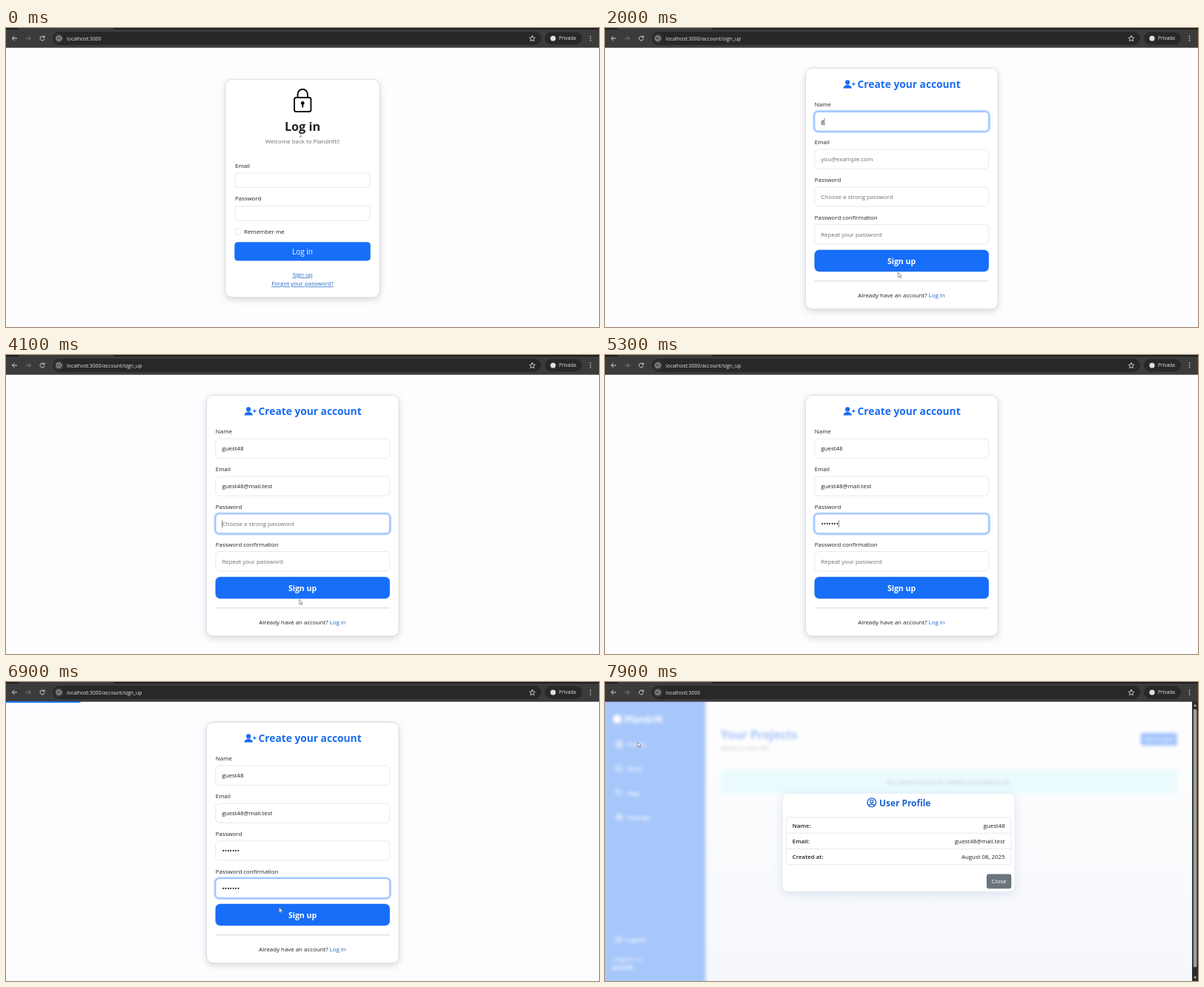
Animation of 800x404 px, one loop 8 s. Source, as an HTML page:

```html
<!DOCTYPE html>
<html lang="en">
<head>
<meta charset="utf-8">
<title>Sign-up walkthrough</title>
<style>
html, body { margin: 0; width: 100%; height: 100%; overflow: hidden; background: #fdfdff; }
svg { display: block; width: 800px; height: 404px; font: 7.9px "Open Sans", "Noto Sans", sans-serif; }
text { fill: #1e2125; white-space: pre; }
.b { font-weight: 700; }
.s { font-weight: 600; }
.m { text-anchor: middle; }
.e { text-anchor: end; }
.w { fill: #fff; }
.mute { fill: #686f76; }
.blue { fill: #1a6cf0; }
.link { fill: #2269c4; }
.u { text-decoration: underline; }
.btn { fill: #176ef8; stroke: #1668ea; stroke-width: .5; }
.line { fill: none; stroke-linecap: round; stroke-linejoin: round; }
.input { fill: #fff; stroke: #dfe2e7; stroke-width: .8; }
.card { fill: #fff; stroke: #d3d6db; stroke-width: .8; filter: drop-shadow(0 3px 4px rgba(0, 0, 0, .14)); }
.url { font-size: 6.9px; fill: #e4e4e4; }

.login, .signup, .dash, .short, .long, .status, .beam { animation: 8s step-end infinite; }
.login { animation-name: login; }
.signup, .long { animation-name: signup; }
.dash { animation-name: dash; }
.short { animation-name: short; }
.status { animation-name: status; }
.beam { animation-name: beam; }
@keyframes login { 0% { opacity: 1 } 15.75%, 100% { opacity: 0 } }
@keyframes signup { 0% { opacity: 0 } 15.75% { opacity: 1 } 86.75%, 100% { opacity: 0 } }
@keyframes dash { 0% { opacity: 0 } 86.75%, 100% { opacity: 1 } }
@keyframes short { 0% { opacity: 1 } 15.75% { opacity: 0 } 86.75%, 100% { opacity: 1 } }
@keyframes status { 0% { opacity: 0 } 8% { opacity: 1 } 21.2%, 100% { opacity: 0 } }
@keyframes beam {
  0% { opacity: 1; transform: translate(397.5px, 144px) }
  2.9% { opacity: 0; transform: translate(355px, 294px) }
  77.5% { opacity: 1; transform: translate(355px, 294px) }
  79.4%, 100% { opacity: 0; transform: translate(355px, 294px) }
}

.arrow { animation: move 8s ease-in-out infinite, seen 8s step-end infinite; }
@keyframes move {
  0%, 2.9% { transform: translate(397px, 150px) }
  8%, 54% { transform: translate(395.5px, 330px) }
  54.1%, 79.4% { transform: translate(359px, 298px) }
  80.6%, 91.2% { transform: translate(368.5px, 304.5px) }
  94.8%, 100% { transform: translate(44px, 81px) }
}
@keyframes seen { 0% { opacity: 0 } 2.9% { opacity: 1 } 54% { opacity: 0 } 79.4%, 100% { opacity: 1 } }

.bar { transform-origin: 0 0; animation: load 8s linear infinite, fade 8s linear infinite; }
@keyframes load {
  0%, 10.6% { transform: scaleX(0) }
  10.7% { transform: scaleX(.1) }
  15.75% { transform: scaleX(.13) }
  16.25% { transform: scaleX(.3475) }
  17%, 17.2% { transform: scaleX(1) }
  17.3%, 83.7% { transform: scaleX(0) }
  83.8% { transform: scaleX(.1) }
  86.7% { transform: scaleX(.13) }
  87.5% { transform: scaleX(.8325) }
  88%, 100% { transform: scaleX(1) }
}
@keyframes fade {
  0%, 16.4% { opacity: 1 }
  17.2% { opacity: 0 }
  17.4%, 87.2% { opacity: 1 }
  88%, 100% { opacity: 0 }
}

.page { animation: blur 8s ease-out infinite; }
.veil { animation: veil 8s ease-out infinite; }
.modal { animation: modal 8s ease-out infinite; }
@keyframes blur { 0%, 96% { filter: blur(0) } 97%, 100% { filter: blur(2.2px) } }
@keyframes veil { 0%, 96% { opacity: 0 } 97%, 100% { opacity: .6 } }
@keyframes modal {
  0%, 96% { opacity: 0; transform: translateY(-20px) }
  97.5%, 100% { opacity: 1; transform: none }
}
</style>
</head>
<body>
<svg viewBox="0 0 800 404">
  <defs>
    <linearGradient id="sky" x2="0" y2="1">
      <stop offset="0" stop-color="#fdfdff"/><stop offset=".4" stop-color="#f7f8fd"/><stop offset="1" stop-color="#e8edf8"/>
    </linearGradient>
    <g id="user" class="line" stroke-width="1.1">
      <circle r="4.7"/><circle cy="-1.1" r="1.6"/><path d="M-3.2 3.2Q0 .2 3.2 3.2"/>
    </g>
  </defs>
  <rect width="800" height="404" fill="#fdfdff"/>

  <g class="login">
    <rect class="card" x="296" y="69.4" width="208" height="294.6" rx="9"/>
    <g class="line" stroke="#111" stroke-width="2">
      <rect x="389" y="94" width="22.4" height="19" rx="2.5"/>
      <path d="M393.5 94V89.5a6.7 6.7 0 0 1 13.4 0V94"/>
      <path d="M400.2 102V106.5"/>
    </g>
    <circle cx="400.2" cy="101.4" r="2.4" fill="#111"/>
    <text class="b m" x="400" y="138.6" font-size="16.2">Log in</text>
    <text class="m mute" x="400" y="155.6">Welcome back to Plandrift!!</text>
    <text x="309" y="189">Email</text>
    <rect class="input" x="309" y="196" width="182" height="19.6" rx="3.5"/>
    <text x="309" y="233.4">Password</text>
    <rect class="input" x="309" y="240.6" width="182" height="19.6" rx="3.5"/>
    <rect class="input" x="309.4" y="271" width="7.8" height="7.8" rx="1.8"/>
    <text x="321" y="278">Remember me</text>
    <rect class="btn" x="308.6" y="289.6" width="182.8" height="24.6" rx="4"/>
    <text class="m w" x="400" y="306" font-size="10">Log in</text>
    <text class="m link u" x="400" y="336">Sign up</text>
    <text class="m link u" x="400" y="348.4">Forgot your password?</text>
  </g>

  <g class="signup">
    <rect class="card" x="270.5" y="54.2" width="259.6" height="325.6" rx="9"/>
    <g class="blue">
      <circle cx="327.2" cy="73.4" r="3.1"/>
      <path d="M321.6 81.6c0-6 11.2-6 11.2 0z"/>
      <path d="M333.2 75.6h4.4M335.4 73.4v4.4" stroke="#1a6cf0" stroke-width="1.2"/>
    </g>
    <text class="b blue" x="340.6" y="81" font-size="13.75">Create your account</text>
    <g id="fields"></g>
    <rect class="btn" x="282.8" y="300" width="234.8" height="29" rx="6"/>
    <text class="b m w" x="400" y="319" font-size="10.5">Sign up</text>
    <path d="M283 341.8H517.5" stroke="#c9cccf" stroke-width=".8"/>
    <text class="m" x="400" y="363.8">Already have an account? <tspan class="link">Log in</tspan></text>
  </g>

  <g class="dash">
    <rect y="26" width="800" height="378" fill="url(#sky)"/>
    <g class="page">
      <rect x="-12" y="12" width="147.6" height="406" fill="#2273f7"/>
      <circle class="w" cx="16.6" cy="50" r="6"/>
      <path d="M26.9 43V58" stroke="#fff" stroke-width=".7"/>
      <text class="b w" x="27.4" y="54.8" font-size="11.5">Plandrift</text>
      <use href="#user" x="19.5" y="84.3" stroke="#fff"/>
      <g class="line" stroke="#fff">
        <path d="M22.8 116.5V120.6H15.4V113.2H20.8M17.3 116.6L19.2 118.4L23.6 113.6"/>
        <path d="M15.4 146.2V149.6L19.6 153.6L23.2 150L19 146.2Z"/><circle cx="17.4" cy="148.2" r=".5"/>
        <circle cx="19.4" cy="182.6" r="1.7"/><circle cx="19.4" cy="182.6" r="3.7"/>
        <circle cx="19.4" cy="182.6" r="4.4" stroke-dasharray="1.2 2.26" stroke-linecap="butt"/>
        <path d="M20.4 346V344.6H14.8V351.4H20.4V350M17.6 348H24M22 346L24 348L22 350"/>
      </g>
      <g class="s">
        <text class="w" x="30" y="87.4">Profile</text>
        <text class="w" x="30" y="120.4">Tasks</text>
        <text class="w" x="30" y="153">Tags</text>
        <text class="w" x="30" y="186">Settings</text>
        <text class="w" x="28" y="351">Logout</text>
      </g>
      <text class="w" x="10.4" y="377.4" font-size="7.1">Logged in as</text>
      <text class="b w" x="10.4" y="388.4" font-size="6.9">guest48</text>
      <text class="b blue" x="156" y="76.8" font-size="15.7">Your Projects</text>
      <text class="mute" x="156" y="91.6">Ready to take off?</text>
      <rect class="btn" x="723" y="69" width="48.6" height="16.6" rx="2"/>
      <text class="m w" x="747.3" y="79.8" font-size="7">New Project</text>
      <rect x="156.3" y="119.8" width="615" height="30" rx="3" fill="#cff5fa" stroke="#b3edf2" stroke-width=".8"/>
      <text class="m" x="463.6" y="137.8" style="fill:#36505c">You haven't joined or created any projects yet.</text>
    </g>
    <rect class="veil" y="26" width="792" height="378" fill="#fff"/>
    <g class="modal">
      <rect x="240" y="151" width="312.4" height="132" rx="8" fill="#fff" style="filter:drop-shadow(0 3px 7px rgba(40,80,160,.16))"/>
      <use href="#user" transform="translate(359.8 162.8) scale(1.25)" stroke="#1c64cc"/>
      <text class="b" x="370" y="167.6" font-size="11.9" style="fill:#1c64cc">User Profile</text>
      <rect class="input" x="244.6" y="183" width="303.4" height="63.8" rx="3"/>
      <path d="M244.6 204.2H548M244.6 225.5H548" stroke="#dfe2e7" stroke-width=".8"/>
      <g class="s">
        <text x="252.8" y="196.6">Name:</text>
        <text x="252.8" y="217.8">Email:</text>
        <text x="252.8" y="239.2">Created at:</text>
      </g>
      <text class="e" x="539.6" y="196.6">guest48</text>
      <text class="e" x="539.6" y="217.8">guest48@mail.test</text>
      <text class="e" x="539.6" y="239.2">August 08, 2025</text>
      <rect x="514.8" y="259.4" width="33.4" height="19.8" rx="3" fill="#6c757d"/>
      <text class="m w" x="531.5" y="272.2" font-size="8">Close</text>
    </g>
    <rect x="792" y="26" width="8" height="378" fill="#2c2c2c"/>
    <rect x="793.8" y="36.5" width="4.6" height="349" rx="2.3" fill="#9f9f9f"/>
    <path d="M793.8 33l2.3-3.4 2.3 3.4zM793.8 398l2.3 3.4 2.3-3.4z" fill="#9f9f9f"/>
  </g>

  <rect width="800" height="26.7" fill="#3b3b3b"/>
  <rect width="800" height="2" fill="#1f1f1f"/>
  <rect x="17" width="128" height="2" fill="#3b3b3b"/>
  <rect x="63" y="5" width="659" height="18" rx="9" fill="#282828"/>
  <rect x="727" y="5.6" width="50" height="16.8" rx="8.4" fill="#282828"/>
  <circle cx="71.3" cy="14" r="6" fill="#3f3f3f"/>
  <g class="line" stroke="#d6d6d6">
    <path d="M14.6 14H8.6M11.2 11.2L8.4 14L11.2 16.8"/>
    <path d="M27 14H33M30.4 11.2L33.2 14L30.4 16.8" stroke="#7c7c7c"/>
    <path d="M51.4 12.2A3 3 0 1 0 51.8 15M51.9 10.8V12.8H49.9"/>
    <circle cx="71.3" cy="14" r="3.2" stroke-width=".8"/>
    <path d="M71.3 13.8V15.6M71.3 12.3V12.4" stroke-width=".8"/>
    <path d="M710 10.4l1.1 2.5 2.7.3-2 1.8.6 2.7-2.4-1.4-2.4 1.4.6-2.7-2-1.8 2.7-.3z" stroke-width=".9"/>
    <path d="M788.5 11V11.1M788.5 14V14.1M788.5 17V17.1" stroke-width="1.6"/>
  </g>
  <circle cx="738" cy="14" r="3.6" fill="#e0e0e0"/>
  <text class="url" x="746" y="16.4" style="font-size:6.6px">Privada</text>
  <text class="url short" x="82" y="16.8">localhost:3000</text>
  <text class="url long" x="82" y="16.8">localhost:3000/account/sign_up</text>
  <rect class="bar" y="26" width="800" height="2" fill="#1c74f2"/>

  <g class="status">
    <path d="M0 395H91.5a2 2 0 0 1 2 2V404H0Z" fill="#262626"/>
    <text class="url" x="2" y="402.2" style="font-size:5.9px">localhost:3000/account/sign_up</text>
  </g>
  <path class="beam line" d="M-1.2 -3.2H1.2M0 -3.2V3.2M-1.2 3.2H1.2" stroke="#666" stroke-width=".7"/>
  <path class="arrow" d="M0 0V6.8L1.6 5.4L2.7 7.8L3.8 7.3L2.7 5H4.7Z" fill="#fff" stroke="#666" stroke-width=".7"/>
</svg>
<script>
const LOOP = 8000, EASE = 70, BLINK = 360, LEFT = 291.4;
// Focus window and typing window of each field, in ms.
const fields = [
  { label: "Name", hint: "Your full name", value: "guest48", focus: [1275, 2765], type: [2000, 2650] },
  { label: "Email", hint: "you@example.com", value: "guest48@mail.test", focus: [2765, 4010], type: [2900, 3880] },
  { label: "Password", hint: "Choose a strong password", value: "•••••••", focus: [4010, 5550], type: [4300, 5200] },
  { label: "Password confirmation", hint: "Repeat your password", value: "•••••••", focus: [5550, 9000], type: [5700, 6220] }
];

const host = document.getElementById("fields");
fields.forEach((f, i) => {
  const y = 113.2 + i * 50.8;
  const size = f.value[0] === "•" ? 9 : 7.9;
  const g = document.createElementNS("http://www.w3.org/2000/svg", "g");
  g.innerHTML = `
    <text x="282.8" y="${y - 6.8}">${f.label}</text>
    <rect class="input" x="282.8" y="${y}" width="234.8" height="26.2" rx="5"/>
    <g class="glow" fill="none">
      <rect x="281.6" y="${y - 1.2}" width="237.2" height="28.6" rx="6" stroke="#0d6efd" stroke-opacity=".27" stroke-width="2.4"/>
      <rect x="282.8" y="${y}" width="234.8" height="26.2" rx="5" stroke="#86b7fe"/>
    </g>
    <text class="mute hint" x="${LEFT}" y="${y + 16.2}">${f.hint}</text>
    <text class="typed" x="${LEFT}" y="${y + 16.2}" font-size="${size}"></text>
    <path class="caret" d="M${LEFT + .3} ${y + 8.4}v10" stroke="#333" stroke-width=".6"/>`;
  host.append(g);
  for (const part of ["glow", "hint", "typed", "caret"]) f[part] = g.querySelector("." + part);
});

const ramp = x => {
  const c = Math.min(1, Math.max(0, x));
  return c * c * (3 - 2 * c);
};

function drawField(f, t) {
  const [on, off] = f.focus, [start, end] = f.type;
  const step = (end - start) / (f.value.length - 1);
  const count = Math.min(f.value.length, Math.max(0, Math.floor((t - start) / step) + 1));
  f.typed.textContent = f.value.slice(0, count);
  f.hint.style.opacity = count ? 0 : 1;
  f.glow.style.opacity = ramp((t - on) / EASE) * (1 - ramp((t - off) / EASE));
  const lastKey = count ? start + (count - 1) * step : on;
  const lit = t >= on && t < off && (t - lastKey) % BLINK < BLINK / 2;
  f.caret.style.opacity = lit ? 1 : 0;
  f.caret.setAttribute("transform", `translate(${count ? f.typed.getComputedTextLength() : 0} 0)`);
}

let origin;
function tick(now) {
  origin ??= now;
  const t = (now - origin) % LOOP;
  fields.forEach(f => drawField(f, t));
  requestAnimationFrame(tick);
}
requestAnimationFrame(tick);
</script>
</body>
</html>
```
